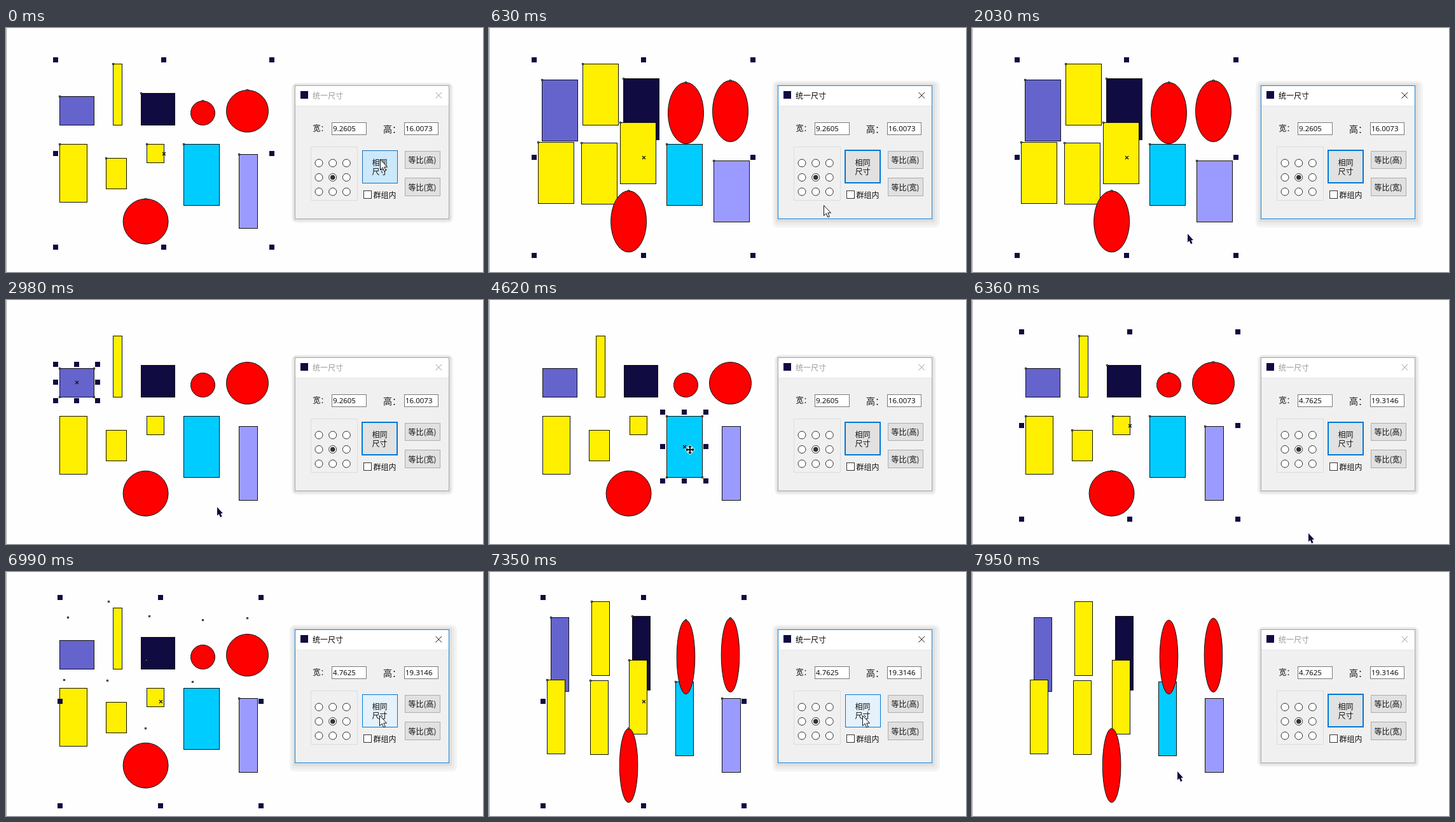
An HTML page that plays this animation: 750x383 px, repeating every 8000 ms.

```html
<!DOCTYPE html>
<html lang="zh">
<meta charset="utf-8">
<style>
html, body { margin: 0; width: 100%; height: 100%; overflow: hidden; background: #fefefe }
svg { display: block; width: 750px; height: 383px }
text { font: 12px "Noto Sans CJK SC", "Noto Sans CJK", "Noto Sans CJK JP", sans-serif; fill: #111 }
.num { font: 11.5px "Open Sans", "Noto Sans", sans-serif; fill: #000 }
.mid { text-anchor: middle }
.btn { fill: #e1e1e1; stroke: #adadad }
.box { fill: #fff; stroke: #7a7a7a }
.dot { fill: #fff; stroke: #333 }
</style>
<svg viewBox="0 0 750 383">
  <path d="M.5 0V383" stroke="#a8a8a8"/>
  <g id="art"></g>
  <g id="shade"></g>
  <rect id="frame" x="454.5" y="90.5" width="242" height="209" fill="#f0f0f0"/>
  <rect x="455" y="91" width="241" height="31" fill="#fff"/>
  <path d="M455 122.5H696" stroke="#e6e6e6"/>
  <rect x="463" y="99" width="12" height="12" fill="#100b40"/>
  <text id="title" x="482" y="111">统一尺寸</text>
  <path id="close" d="M675.5 101l9.5 9.5M685 101l-9.5 9.5" fill="none"/>
  <text x="482.5" y="162">宽：</text>
  <text x="593" y="164" style="font-size:14px">高：</text>
  <rect class="box" x="512.5" y="148.5" width="54" height="19"/>
  <rect class="box" x="626.5" y="148.5" width="53" height="19"/>
  <text id="wide" class="num" x="514" y="162"></text>
  <text id="high" class="num" x="628" y="162"></text>
  <rect x="479.5" y="186.5" width="73" height="84" fill="none" stroke="#dcdcdc"/>
  <g id="radios"></g>
  <rect id="same" x="560" y="192" width="55" height="51"/>
  <text class="mid" x="587.5" y="215.5">相同</text>
  <text class="mid" x="587.5" y="229.5">尺寸</text>
  <rect class="btn" x="627.5" y="193.5" width="55" height="27"/>
  <text class="mid" x="654.5" y="211.5">等比(高)</text>
  <rect class="btn" x="627.5" y="235.5" width="55" height="28"/>
  <text class="mid" x="654.5" y="254.5">等比(宽)</text>
  <rect class="dot" x="562.5" y="255.5" width="12" height="12"/>
  <text x="577.5" y="267">群组内</text>
  <g id="over"></g>
</svg>
<script>
const $ = id => document.getElementById(id);
const INK = '#100b40', RED = '#f00', YELLOW = '#fff000', BLUE = '#0078d7';

// centre x, centre y, width, height, colour, round; back to front
const shapes = [
  [111.4, 129.5, 54.6, 45, '#6464cc'],
  [175.5, 104.5, 14.6, 95.6, YELLOW],
  [239.4, 127.5, 53, 50, INK],
  [105.5, 227.7, 43, 91, YELLOW],
  [173.6, 228.8, 32, 48, YELLOW],
  [234.5, 196.8, 27, 29.6, YELLOW],
  [307.5, 230.5, 56, 96.2, '#00ccff'],
  [381, 256.8, 28.6, 116.2, '#9b9bff'],
  [309.5, 133.5, 38, 38, RED, 1],
  [379.5, 130.5, 66, 66, RED, 1],
  [219.6, 303.7, 71, 71, RED, 1]
];
const PURPLE = 0, CYAN = 6, LILAC = 7;
const BIG = [56, 96.2], THIN = [28.6, 116.2];

// first step, last step, x, y
const moves = [
  [270, 750, 510, 296], [1310, 2030, 339, 323], [2280, 2280, 335, 324],
  [2430, 2550, 332, 325], [3100, 3220, 327, 318], [3370, 3490, 308, 262],
  [3610, 3730, 461, 253], [3980, 4220, 269, 238], [4620, 4620, 316, 235],
  [4740, 4860, 358, 249], [5010, 5130, 376, 262], [5250, 5730, 139, 77],
  [5850, 5850, 38, 28], [5970, 5970, 521, 202], [6120, 6240, 529, 367],
  [6360, 6480, 528, 364], [6630, 6870, 587, 225], [7470, 7830, 323, 313]
];
const STEP = 120;

// last value whose start time has passed
const at = (t, list) => list.filter(e => e[0] <= t).pop()[1];
const within = (t, a, b) => t >= a && t < b;

function pointer(t) {
  let x = 588, y = 206;
  for (const [a, b, nx, ny] of moves) {
    if (t < a) break;
    const k = Math.min(1, (Math.floor((t - a) / STEP) + 1) / ((b - a) / STEP + 1));
    x += (nx - x) * k;
    y += (ny - y) * k;
  }
  return [Math.round(x), Math.round(y)];
}

// rectangle edges sit on whole pixels, ellipses stay smooth
function bounds([cx, cy, w, h, , round], size) {
  if (size) [w, h] = size;
  const snap = v => round ? v : Math.floor(v) + .5;
  const x = snap(cx - w / 2), y = snap(cy - h / 2);
  return [x, y, snap(cx + w / 2) - x, snap(cy + h / 2) - y];
}

const rect = (x, y, w, h, attrs) => `<rect x="${x}" y="${y}" width="${w}" height="${h}" ${attrs}/>`;

function drawShape(s, size) {
  const [x, y, w, h] = bounds(s, size);
  return rect(x, y, w, h, `fill="${s[4]}" stroke="#111"` +
    (s[5] ? ` rx="${w / 2}" ry="${h / 2}"` : ''));
}

const node = (x, y) => rect(Math.floor(x) - .5, Math.floor(y) - .5, 2, 2, 'fill="#fff" stroke="#111"');

function drawSelection(list, size) {
  const boxes = list.map(s => bounds(s, size));
  const l = Math.min(...boxes.map(b => b[0])), r = Math.max(...boxes.map(b => b[0] + b[2]));
  const u = Math.min(...boxes.map(b => b[1])), d = Math.max(...boxes.map(b => b[1] + b[3]));
  const cx = (l + r) / 2, cy = (u + d) / 2;
  let out = '';
  boxes.forEach(([x, y, w, h], i) => {
    out += node(list[i][5] ? x + w / 2 : x, y);
    if (list.length == 1) out += node(x + w, y) + node(x, y + h) + node(x + w, y + h);
  });
  for (const x of [l - 6, cx, r + 6])
    for (const y of [u - 6, cy, d + 6])
      if (x != cx || y != cy)
        out += rect(Math.round(x - 5), Math.round(y - 5), 8, 8, `fill="${INK}"`);
  const mx = Math.round(cx - 3), my = Math.round(cy - 3);
  return out + `<path d="M${mx} ${my}l5 5m0-5l-5 5" stroke="#111" stroke-width="1.2" fill="none"/>`;
}

function drawCursor(x, y, single) {
  const put = (d, attrs) => `<path transform="translate(${x} ${y})" d="${d}" ${attrs}/>`;
  if (x >= 454 && x < 697 && y > 90 && y < 300)
    return put('M.5.5V16.5L4.2 13 6.8 19 9.3 18 6.8 12.2H11.5Z', 'fill="#fff" stroke="#111"');
  if (single) {
    const [l, u, w, h] = bounds(single);
    if (x > l && x < l + w && y > u && y < u + h) {
      const d = 'M0-7L3-4H1V-1H4V-3L7 0 4 3V1H1V4H3L0 7-3 4H-1V1H-4V3L-7 0-4-3V-1H-1V-4H-3Z';
      return put(d, 'fill="#111" stroke="#fff" stroke-width="1.6" paint-order="stroke"');
    }
  }
  return put('M0 0V13.5L2.8 11 5 16 7.6 15 5.6 10H9Z', `fill="${INK}"`);
}

function drawShade(active) {
  const [l, u, r, d] = active ? [8, 7, 12, 13] : [5, 4, 6, 6];
  return ['#f3f3f3', '#ebebeb', '#dedede'].map((c, i) => {
    const k = 1 - i * .33;
    return rect(454 - l * k, 90 - u * k, 243 + (l + r) * k, 210 + (u + d) * k, `rx="${8 * k}" fill="${c}"`);
  }).join('');
}

function set(id, attrs) {
  for (const k in attrs) $(id).setAttribute(k, attrs[k]);
}

function draw(now) {
  const t = now % 8000;
  const [x, y] = pointer(t);
  const size = at(t, [[0, null], [270, BIG], [2980, null], [7110, THIN]]);
  const goal = at(t, [[0, null], [120, BIG], [2430, null], [6990, THIN]]);
  const picked = at(t, [[0, shapes], [2430, []], [2980, [shapes[PURPLE]]], [3490, [shapes[CYAN]]],
    [5010, [shapes[LILAC]]], [6360, shapes], [7950, []]]);
  const active = within(t, 120, 2430) || within(t, 6990, 7950);
  const pressed = t < 120 || within(t, 6870, 6990);
  const hover = x > 559 && x < 616 && y > 191 && y < 244;

  $('art').innerHTML = shapes.map(s => drawShape(s, size)).join('') +
    (picked.length ? drawSelection(picked, goal) : '');
  $('shade').innerHTML = drawShade(active);
  set('frame', { stroke: active ? '#1883d7' : '#aaa' });
  set('close', { stroke: active ? '#111' : '#999' });
  $('title').style.fill = active ? '#000' : '#999';
  const [w, h] = at(t, [[0, ['9.2605', '16.0073']], [3100, ['9.1017', '7.5406']],
    [3610, ['9.2605', '16.0073']], [5250, ['4.7625', '19.3146']]]);
  $('wide').textContent = w;
  $('high').textContent = h;
  const lit = pressed || hover;
  set('same', {
    fill: pressed ? '#cce8fb' : hover ? '#e5f1fb' : '#e1e1e1',
    stroke: pressed ? '#1c6fb5' : BLUE,
    'stroke-width': lit ? 1 : 2,
    transform: lit ? 'translate(.5 .5)' : ''
  });
  const marquee = within(t, 5970, 6360)
    ? rect(38.5, 28.5, x - 38, y - 28, `fill="none" stroke="${INK}" stroke-dasharray="3 3"`) : '';
  $('over').innerHTML = marquee + drawCursor(x, y, picked.length == 1 && picked[0]);
  requestAnimationFrame(draw);
}

let radios = '';
for (const cy of [212, 234.5, 257])
  for (const cx of [492, 513.7, 535.3])
    radios += `<circle class="dot" cx="${cx}" cy="${cy}" r="6"/>`;
$('radios').innerHTML = radios + '<circle cx="513.7" cy="234.5" r="3.8" fill="#333"/>';
draw(0);
</script>
</html>
```
